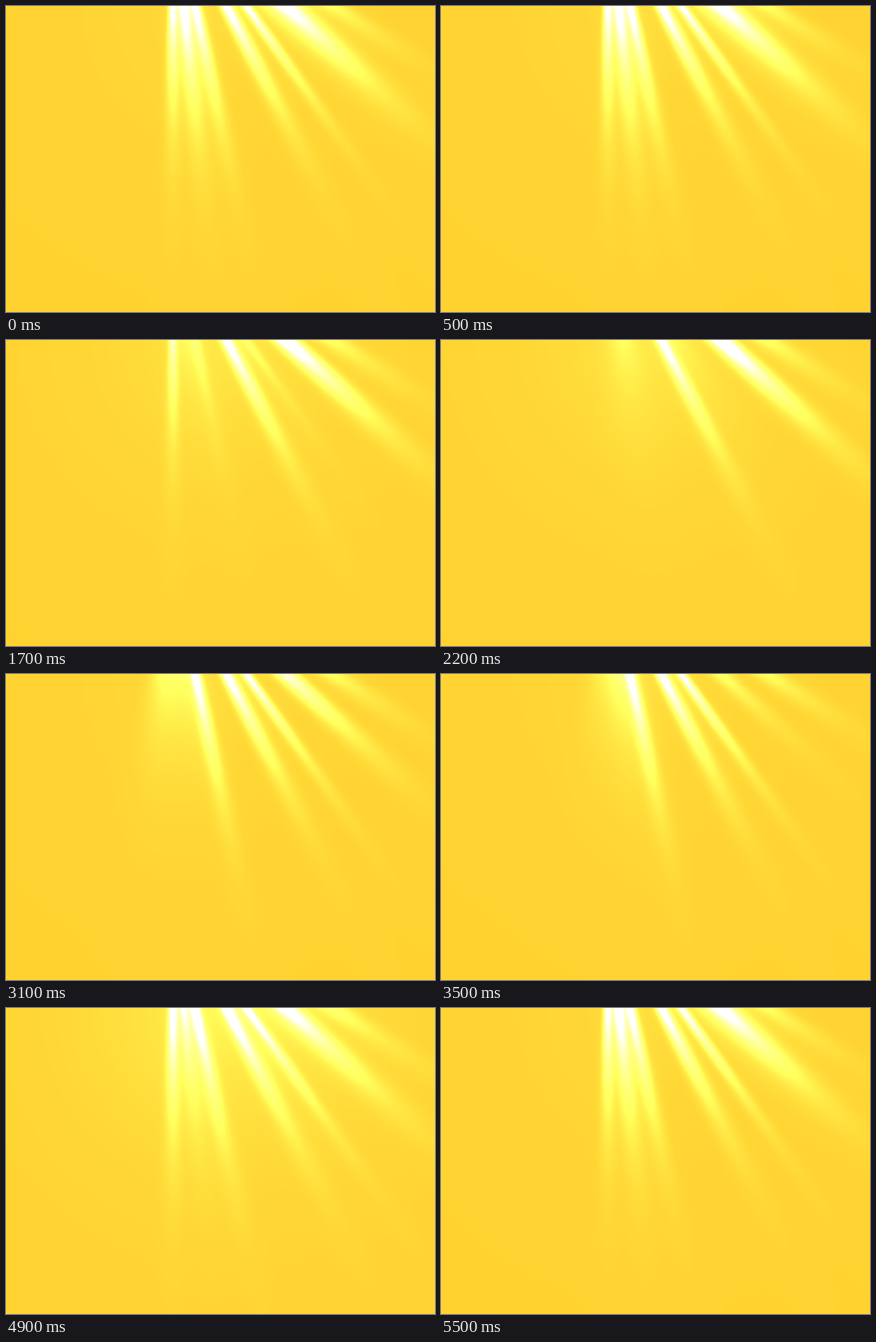
An HTML page with a canvas that plays this animation: 600 px wide and 429 px high, repeating every 5600 ms.

```html
<!DOCTYPE html>
<html lang="en">
<head>
<meta charset="utf-8">
<title>Light rays</title>
<style>
  html, body { margin: 0; width: 100%; height: 100%; overflow: hidden; background: #ffd230; }
  canvas { display: block; width: 100%; height: 100%; }
</style>
</head>
<body>
<canvas id="stage" width="600" height="429"></canvas>
<script>
const W = 600, H = 429, LOOP = 5600, STEP = 100;
const ctx = document.getElementById('stage').getContext('2d');
const image = ctx.createImageData(W, H);
const px = image.data;

// The lamp sits above the stage; rays fan out from it.
const LAMP_X = 233, LAMP_H = 145, RAY_LENGTH = 75;
const GLOW_X = 310, GLOW_LENGTH = 130;
const BASE_G = 210, BASE_B = 48;

const pulse = (time, reach, gain) => ({ time, reach, gain });
const ray = (offset, spread, level, ...pulses) => ({ offset, spread, level, pulses });

const RAYS = [
  ray(-10, 13, 0, pulse(3100, 500, 50)),
  ray(0, 3.5, 250, pulse(2850, 1500, -250)),
  ray(15, 5, 0, pulse(0, 900, 300)),
  ray(31, 4.2, 270, pulse(2200, 800, -270)),
  ray(20, 14, 30, pulse(3950, 1100, 45)),
  ray(75, 5, 270),
  ray(103, 4, 230, pulse(2200, 800, -230)),
  ray(90, 14, 20, pulse(4400, 700, 35)),
  ray(158, 10, 180, pulse(2200, 800, 180), pulse(3650, 400, -130)),
  ray(155, 20, 0, pulse(0, 900, 110)),
  ray(222, 15, 45)
];
const GLOW = { level: 12, pulses: [pulse(2200, 800, 14), pulse(4400, 700, 48)] };
const FLASH = { level: 1, pulses: [pulse(4400, 700, 0.35)] };

// Soft bump around a time, level in its middle half, wrapping with the loop.
function bump(t, { time, reach }) {
  const gap = Math.abs(t - time);
  const k = Math.max(0, Math.min(1, 2 - 2 * Math.min(gap, LOOP - gap) / reach));
  return k * k * (3 - 2 * k);
}

const levelAt = ({ level, pulses }, t) =>
  pulses.reduce((sum, p) => sum + p.gain * bump(t, p), level);

// Fixed geometry: which ray offset each pixel lies on, and how light fades there.
const U_MIN = -240, RES = 10, SIZE = 6200;
const slot = new Uint16Array(W * H);
const fade = new Float32Array(W * H);
const glowFade = new Float32Array(W * H);
for (let y = 0, p = 0; y < H; y++) {
  for (let x = 0; x < W; x++, p++) {
    const u = (x - LAMP_X) * LAMP_H / (y + LAMP_H);
    slot[p] = Math.round((u - U_MIN) * RES);
    fade[p] = Math.exp(-y * Math.hypot(1, u / LAMP_H) / RAY_LENGTH);
    glowFade[p] = Math.exp(-Math.hypot(x - GLOW_X, y) / GLOW_LENGTH);
  }
}

const profile = new Float32Array(SIZE);

function addRay(r, t) {
  const level = levelAt(r, t);
  for (let i = 0; i < SIZE; i++) {
    const d = (i / RES + U_MIN - r.offset) / r.spread;
    profile[i] += level * Math.exp(-d * d / 2);
  }
}

function draw(t) {
  profile.fill(0);
  RAYS.forEach(r => addRay(r, t));
  const flash = levelAt(FLASH, t), glow = levelAt(GLOW, t);
  for (let p = 0; p < W * H; p++) {
    const light = profile[slot[p]] * fade[p] * flash + glow * glowFade[p];
    px[4 * p] = 255;
    px[4 * p + 1] = BASE_G + light;
    px[4 * p + 2] = BASE_B + light;
    px[4 * p + 3] = 255;
  }
  ctx.putImageData(image, 0, 0);
}

const start = performance.now();
let shown = -1;

function tick() {
  const elapsed = Math.max(0, performance.now() - start) % LOOP;
  const t = Math.floor(elapsed / STEP) * STEP;
  if (t !== shown) draw(shown = t);
  requestAnimationFrame(tick);
}
tick();
</script>
</body>
</html>
```
